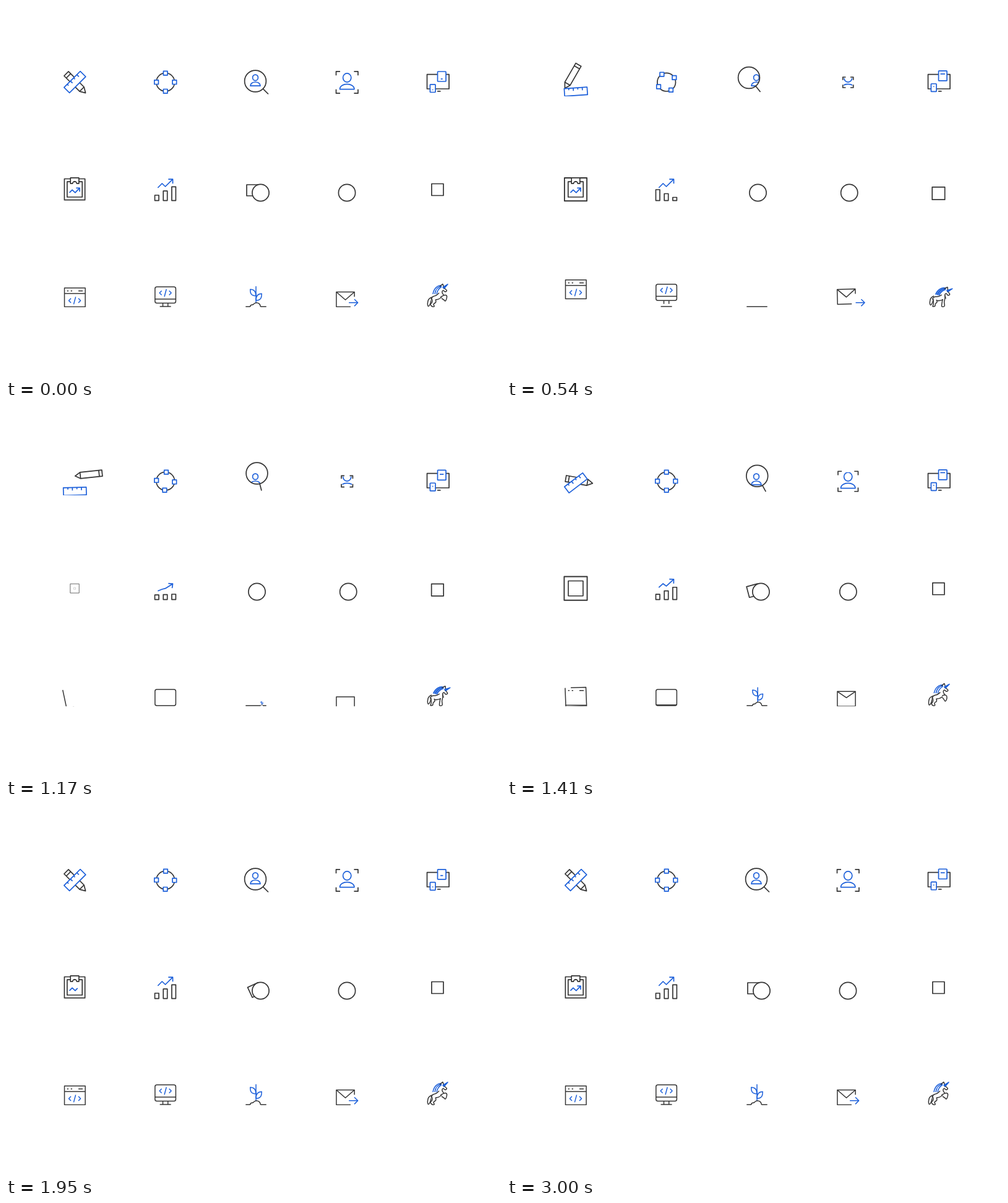
Recreate the animation shown at these times as an HTML page with a canvas. Size 800x600 px, loop 3.03 s.

```html
<!DOCTYPE html>
<html>
<head>
<meta charset="utf-8">
<style>
html, body { margin: 0; width: 100%; height: 100%; overflow: hidden; background: #fff; }
canvas { display: block; }
</style>
</head>
<body>
<canvas id="stage" width="800" height="600"></canvas>
<script>
const ctx = document.getElementById('stage').getContext('2d');
const LOOP = 3030, INK = '#343434', BLUE = '#1d60da', RAD = Math.PI / 180;
// Shared beats, in ms
const OUT = 430, HIT = 540, HOLD = 780, GONE = 960, BACK = 1170, READY = 1500, LAND = 1650, REST = 1900;
let t = 0, late = false;

// Smooth keyframes without overshoot: each key is [time, ...values]
function keys(...k) {
  const last = k.length - 1;
  if (t <= k[0][0]) return k[0].slice(1);
  if (t >= k[last][0]) return k[last].slice(1);
  let i = 0;
  while (t > k[i + 1][0]) i++;
  const h = k[i + 1][0] - k[i][0], u = (t - k[i][0]) / h;
  const slope = (j, c) => (k[j + 1][c] - k[j][c]) / (k[j + 1][0] - k[j][0]);
  const tangent = (j, c) => {
    if (j === 0 || j === last) return 0;
    const a = slope(j - 1, c), b = slope(j, c);
    return a * b > 0 ? 2 * a * b / (a + b) : 0;
  };
  return k[i].slice(1).map((v, n) => {
    const c = n + 1, w = k[i + 1][c];
    return v + (w - v) * u * u * (3 - 2 * u)
      + h * u * (1 - u) * ((1 - u) * tangent(i, c) - u * tangent(i + 1, c));
  });
}
const key = (...k) => keys(...k)[0];
const ramp = (a, b) => key([a, 0], [b, 1]);

function paint(color, fill) {
  if (fill) { ctx.fillStyle = fill; ctx.fill(); }
  ctx.strokeStyle = color;
  ctx.stroke();
}
function line(p, color = INK, closed = false, fill = null) {
  ctx.beginPath();
  for (let i = 0; i < p.length; i += 2) ctx.lineTo(p[i], p[i + 1]);
  if (closed) ctx.closePath();
  paint(color, fill);
}
const hline = (x0, x1, y, color) => line([x0, y, x1, y], color);
const vline = (x, y0, y1, color) => line([x, y0, x, y1], color);
function curve(p, color = INK) {
  const n = p.length;
  ctx.beginPath();
  ctx.moveTo(p[0], p[1]);
  for (let i = 2; i < n - 4; i += 2)
    ctx.quadraticCurveTo(p[i], p[i + 1], (p[i] + p[i + 2]) / 2, (p[i + 1] + p[i + 3]) / 2);
  ctx.quadraticCurveTo(p[n - 4], p[n - 3], p[n - 2], p[n - 1]);
  paint(color);
}
function box(x, y, w, h, color = INK, fill = null, r = 0) {
  ctx.beginPath();
  ctx.roundRect(x, y, w, h, r);
  paint(color, fill);
}
const square = (x, y, half, color, fill) => box(x - half, y - half, 2 * half, 2 * half, color, fill);
function oval(x, y, rx, ry = rx, color = INK, fill = null) {
  ctx.beginPath();
  ctx.ellipse(x, y, rx, ry, 0, 0, 7);
  paint(color, fill);
}
function place(x, y, deg, scale, draw) {
  if (scale <= 0.01) return;
  ctx.save();
  ctx.translate(x, y);
  ctx.rotate(deg * RAD);
  ctx.scale(scale, scale);
  draw();
  ctx.restore();
}
function clipped(x, y, w, h, draw) {
  ctx.save();
  ctx.beginPath();
  ctx.rect(x, y, w, h);
  ctx.clip();
  draw();
  ctx.restore();
}

function pencilAndRuler() {
  const [px, py, pa] = keys([0, 113, 125, -135], [OUT, 103, 114, -60], [HIT, 104.5, 114, -60],
    [HOLD, 118.5, 113.5, -60], [GONE, 130, 113.5, -60], [BACK, 133.5, 112.5, -6.5], [READY, 113, 125, 225]);
  const [ry, ra] = keys([0, 123, -45], [HIT, 138.5, -4], [HOLD, 139.3, 0],
    [BACK, 139.6, -1.5], [READY, 123, -45]);
  place(px, py, pa, 1, () => {
    line([-22, 0, -13.5, -5, 22, -5, 22, 5, -13.5, 5], INK, true, '#fff');
    vline(-13.5, -5, 5);
    vline(17, -5, 5);
  });
  place(111.3, ry, ra, 1, () => {
    box(-18.5, -6.2, 37, 12.4, BLUE, '#fff');
    for (let i = 0; i < 4; i++) vline(-11.2 + i * 7.3, -6.2, i % 2 ? -1.5 : -3.2, BLUE);
  });
}

function nodes() {
  const turn = key([0, 0], [HIT, 60], [HOLD, 45], [GONE, 45], [BACK, 95], [LAND, 85], [REST, 91], [2310, 90]);
  oval(257.7, 123.2, 14.8);
  for (let i = 0; i < 4; i++) {
    const a = (turn + i * 90) * RAD;
    square(257.7 + 14.6 * Math.sin(a), 123.2 - 14.6 * Math.cos(a), 3.3, BLUE, '#fff');
  }
}

function person(x, y, r, base, half, rise) {
  oval(x, y, r, r * 1.08, BLUE);
  ctx.beginPath();
  ctx.moveTo(x - half, base);
  ctx.bezierCurveTo(x - half, base - rise, x + half, base - rise, x + half, base);
  ctx.closePath();
  paint(BLUE);
}

function magnifier() {
  const [x, y, hx, hy] = keys([0, 403, 121.5, 424, 142.5], [HIT, 391, 116, 409.5, 139],
    [HOLD, 394, 114.5, 410, 139], [BACK, 405.5, 110.5, 413, 138.5],
    [LAND, 403, 120, 423, 142], [REST, 403, 121.5, 424, 142.5]);
  const r = 17.4, k = r / Math.hypot(hx - x, hy - y);
  ctx.save();
  ctx.beginPath();
  ctx.arc(x, y, r, 0, 7);
  ctx.clip();
  person(403, 115.8, 4.4, 129.2, 8, 8.3);
  ctx.restore();
  oval(x, y, r);
  line([x + (hx - x) * k, y + (hy - y) * k, hx, hy]);
}

function faceScan() {
  const s = key([0, 17.7], [OUT, 8.7], [HOLD, 8.3], [BACK, 9.2], [READY, 17.7]);
  const arm = 4.8 + (s - 8.7) * 0.19, cx = 551.2, cy = 123.5, inner = s - 1.5;
  clipped(cx - inner, cy - inner, 2 * inner, 2 * inner, () => person(cx, 116, 6.6, 134.6, 11.7, 11));
  for (const i of [-1, 1]) for (const j of [-1, 1])
    line([cx + i * (s - arm), cy + j * s, cx + i * s, cy + j * s, cx + i * s, cy + j * (s - arm)]);
}

function devices() {
  const c = Math.cos(t / 450 * Math.PI), lift = 1.3 * ((1 - c) / 2) ** 2, w = 2.75 - 1.25 * c;
  box(680.5, 110.7, 35.5, 23.3);
  hline(697, 702.5, 137.8);
  box(697.5, 106 - lift, 13.5, 16, BLUE, '#fff', 0.8);
  hline(704.2 - w, 704.2 + w, 113.5 + 4.5 * c, BLUE);
  box(685.4, 126.8 - lift, 8.6, 12.7, BLUE, '#fff', 0.8);
  hline(689, 690.4, 132.6 + 2.9 * c, BLUE);
}

function trend(x, y, s, shown = 1) {
  place(x, y, 0, s, () => {
    ctx.setLineDash([28 * shown, 99]);
    line([-8.5, 4.5, -4, 0, 0.8, 4.5, 8, -3], BLUE);
    ctx.setLineDash([]);
    if (shown > 0.9) line([2.3, -3, 8, -3, 8, 2.8], BLUE);
  });
}

function clipboard() {
  const cx = 111, cy = 296.7;
  const outer = key([0, 1], [HIT, 1.09], [HOLD, 1.03], [980, 0], [1090, 0], [BACK, 0.43], [1420, 1.12], [LAND, 1.06], [REST, 1]);
  const inner = key([600, 1], [HOLD, 0.66], [920, 0], [1130, 0], [BACK, 0.12], [READY, 1.1], [LAND, 1.08], [REST, 1]);
  const size = late ? 1 : inner;
  place(cx, cy, 0, outer, () => box(-16.6, -17.2, 33.2, 34.2));
  place(cx, cy, 0, inner, () => box(-12.2, -12.5, 24.4, 24.8));
  if (!late || t > READY) {
    const drop = late ? key([READY, -24], [LAND, -14], [1830, 0]) : 0;
    place(cx, cy + drop, 0, size, () => {
      ctx.beginPath();
      ctx.moveTo(-6.8, -18.8);
      ctx.lineTo(6.8, -18.8);
      ctx.lineTo(6.8, -9.5);
      ctx.arc(0, -9.5, 3.4, 0, Math.PI, true);
      ctx.lineTo(-6.8, -9.5);
      ctx.closePath();
      paint(INK, '#fff');
    });
  }
  if (!late || t > 1750) trend(cx, cy + 0.7, size, late ? ramp(1750, 2080) : 1);
}

function bars() {
  const tops = keys([0, 306, 299.2, 292.3], [HIT, 297, 303.5, 309.5], [HOLD, 303.5, 300.3, 297],
    [BACK, 307.2, 306.7, 306], [READY, 306, 299.2, 292.3]);
  tops.forEach((y, i) => box(240.5 + i * 13.7, y, 6.5, 314.6 - y));
  const f = key([850, 0], [1100, 1], [BACK, 1], [READY, 0]), y = 280.2 + 9 * f;
  line([245.3, 294 + 6.7 * f, 252.2, 287 + 11 * f, 257.5, 292 + 4.7 * f, 269.5, y], BLUE);
  line([262.3, y - f / 2, 269.5, y, 269.5 - f, y + 7], BLUE);
}

function tokens() {
  const [sx, sy, sa] = keys([0, 398, 298, 0], [OUT, 405, 302, 0], [1100, 405, 302, 0],
    [LAND, 393.5, 299, -25], [2000, 403, 301, -25], [2310, 400, 300, -20], [2800, 398, 298, 0]);
  const away = key([0, 0], [OUT, 1], [BACK, 1], [READY, 0]);
  place(sx, sy, sa, 1, () => square(0, 0, 9));
  oval(411.5 - 6 * away, 302, 13.6, 13.6, INK, '#fff');
  oval(551 + 2.2 * away, 302, 13.6);
  const low = key([0, 0], [OUT, 1], [GONE, 1], [BACK, 0.35], [READY, 0]);
  square(697.4, 297 + 6 * low, 9.5 + 0.7 * low);
}

function code(x, y, s = 1) {
  place(x, y, 0, s, () => {
    for (const d of [-1, 1]) line([6 * d, -3.6, 9.5 * d, 0, 6 * d, 3.6], BLUE);
    line([1.6, -6, -1.6, 6], BLUE);
  });
}

function browser() {
  const dy = late ? key([READY, 1], [REST, 0])
    : key([0, 0], [OUT, -13.2], [HIT, -13], [HOLD, -10.5], [GONE, 36]);
  const shown = late ? key([1060, 0], [BACK, 0.33], [READY, 1]) : 1;
  const tilt = late ? key([BACK, -12], [READY, 0]) : 0;
  place(111.3, 471.3 + dy, tilt, 1, () => {
    ctx.setLineDash([129 * shown, 200]);
    line([-16.8, -15.3, -16.8, 15.2, 16.8, 15.2, 16.8, -15.3], INK, true);
    ctx.setLineDash([]);
  });
  if (late && t < 1400) return;
  const head = late ? key([1350, 486], [LAND, 468.8], [REST, 465]) : 465;
  hline(94.5, 128, head + dy);
  for (const [x, w] of [[98.7, 2.3], [104.7, 2.3], [117, 7]]) hline(x, x + w, 460.8 + dy);
  code(111, 476.4 + (late ? 0 : dy), late ? key([READY, 0], [LAND, 0.52], [REST, 1]) : 1);
}

function monitor() {
  const top = key([0, 454.3], [HIT, 450], [HOLD, 464.5], [920, 480], [BACK, 460], [1400, 460],
    [LAND, 456], [REST, 454.3]);
  const chin = late ? key([1350, 26], [LAND, 17.5], [REST, 19.6]) : key([HIT, 19.6], [HOLD, 4.5], [850, 0]);
  const x = 240.8, w = 33.6, mid = x + w / 2, bottom = top + 26.2;
  box(x, top, w, 26.2, INK, null, 3);
  if (t < 850 || t > 1400) hline(x, x + w, top + chin);
  const legs = late ? ramp(READY, LAND) : 1 - ramp(HIT, 680);
  if (legs > 0) {
    const foot = Math.min(486, bottom + 5.5 * legs);
    for (const d of [-4.1, 4.1]) vline(mid + d, bottom, foot);
    hline(mid - 9 * legs, mid + 9 * legs, 486);
  }
  if (t < HOLD - 20 || t > READY) {
    ctx.globalAlpha = late ? key([READY, 0], [LAND, 0.5], [REST, 1]) : 1;
    code(mid, top + 9.7 + (late ? 0 : 30 * ramp(HIT, HOLD - 20)));
    ctx.globalAlpha = 1;
  }
}

function leaf(y, dx, dy) {
  ctx.beginPath();
  ctx.moveTo(0, y);
  ctx.bezierCurveTo(dx, y, dx, y + dy * 0.6, dx, y + dy);
  ctx.bezierCurveTo(dx * 0.3, y + dy, 0, y + dy * 0.65, 0, y);
  paint(BLUE);
}

function plant() {
  const floor = 486.2, left = 387.3, right = 420.7;
  const g = late ? key([1080, 0], [BACK, 0.22], [READY, 1]) : 1 - ramp(0, OUT);
  const x = late ? key([1080, 416], [BACK, 413.5], [READY, 404]) : 404;
  if (g < 0.01) return hline(left, right, floor);
  place(x, floor, 0, g, () => {
    ctx.lineWidth = 1.5 / Math.max(g, 0.4);
    vline(0, -33, -6, BLUE);
    leaf(-17.5, -9.3, -10.5);
    leaf(-10, 9.2, -11);
    ctx.beginPath();
    ctx.arc(-6.2, 0, 3, Math.PI, 5);
    ctx.arc(1, 0, 6.3, Math.PI + 0.7, 2 * Math.PI);
    paint(INK);
  });
  hline(left, x - 9.2 * g, floor);
  hline(Math.min(420, x + 7.3 * g), right, floor);
}

function envelope() {
  const [x, y, a] = late
    ? keys([1040, 548.5, 502, 0], [BACK, 548.5, 484, 0], [READY, 548.5, 474.5, 0])
    : keys([0, 548.5, 474.5, 0], [HIT, 548.5, 470, -1.5], [HOLD, 546.5, 475, -23], [GONE, 546, 510, -36]);
  const flap = late ? ramp(1200, READY) : 1;
  const [side, base] = late ? keys([READY, 24, 29], [LAND, 16.5, 26.5], [REST, 7.8, 23]) : [7.8, 23];
  const w = 14.6, h = 12;
  place(x, y, a, 1, () => {
    line([w, side - h, w, -h, -w, -h, -w, h, base - w, h]);
    if (flap > 0) line([-w, -h, 0, 12.8 * flap - h, w, -h]);
  });
  const [tip, s] = late ? keys([1560, 545, 0], [LAND, 549, 0.45], [REST, 568.6, 1])
    : keys([0, 568.6, 1], [HIT, 578, 1], [680, 584, 1]);
  ctx.globalAlpha = late ? 1 : 1 - ramp(HIT, 680);
  place(tip, 479.8, 0, s, () => {
    hline(-14.5, 0, 0, BLUE);
    line([-5.6, -5.6, 0, 0, -5.6, 5.6], BLUE);
  });
  ctx.globalAlpha = 1;
}

function mane(i) {
  ctx.beginPath();
  ctx.moveTo(10 + 3 * i, 18);
  ctx.bezierCurveTo(11 + 3 * i, 10 + i, 17 + i, 3 + 3 * i, 24, 4 + i);
}

function unicorn() {
  const pose = late ? 1 - ramp(1200, READY) : ramp(0, OUT);
  const shift = key([HOLD, 0], [BACK, -2], [READY, 0]);
  const mix = (a, b) => a.map((v, i) => v + (b[i] - v) * pose);
  const glow = key([250, 0], [HIT, 0.75], [HOLD - 20, 0], [GONE, 0], [BACK, 0.75], [1450, 0]);
  const haunch = [8, 25, 10, 31], paw = mix([5, 34, 9, 39, 13, 38, 10, 34], [8, 38, 8, 38, 12, 38, 12, 33]);
  place(680 + shift, 448, 0, 1, () => {
    place(pose * 2, -2 * pose, 0, 1, () => curve([8, 23, 3, 25, 1, 33, 2, 39, 6, 34, 7, 28]));
    curve([...haunch, ...paw, 16, 31, 14, 27]);
    curve(mix([22, 23, 28, 19, 33, 20, 32, 26, 30, 30, 28, 27, 24, 25],
      [28, 20, 28, 26, 26, 31, 28, 38, 22, 39, 23, 32, 24, 26]));
    // The upper body tips forward about the rump
    place(9 + pose, 24, 15 * pose, 1, () => {
      ctx.translate(-9, -24);
      if (glow > 0) {
        ctx.globalAlpha = glow;
        ctx.fillStyle = BLUE;
        mane(0);
        ctx.lineTo(18, 12);
        ctx.lineTo(16, 18);
        ctx.fill();
        ctx.globalAlpha = 1;
      }
      for (let i = 0; i < 3; i++) { mane(i); paint(BLUE); }
      curve([7, 27, 8, 23, 12, 21, 16, 20, 20, 16]);
      curve([14, 27, 19, 27, 24, 23]);
      curve([21, 6, 24, 3, 26, 1, 27, 6, 30, 10, 33, 12, 30, 15, 26, 11, 24, 16, 28, 20]);
      line([26, 7, 34, 2, 28, 9], BLUE, true, BLUE);
      hline(27, 27.7, 8.7);
    });
  });
}

function draw() {
  late = t > 1020;
  ctx.fillStyle = '#fff';
  ctx.fillRect(0, 0, 800, 600);
  ctx.lineJoin = 'round';
  ctx.lineWidth = 1.7;
  clipped(70, 80, 100, 66, pencilAndRuler);
  for (const icon of [nodes, magnifier, faceScan, devices, clipboard, bars, tokens]) icon();
  ctx.lineWidth = 1.5;
  clipped(0, 430, 800, 57.3, () => {
    for (const icon of [browser, monitor, plant, envelope, unicorn]) icon();
  });
}

const start = performance.now();
function tick() {
  t = (performance.now() - start) % LOOP;
  draw();
  requestAnimationFrame(tick);
}
tick();
</script>
</body>
</html>
```
